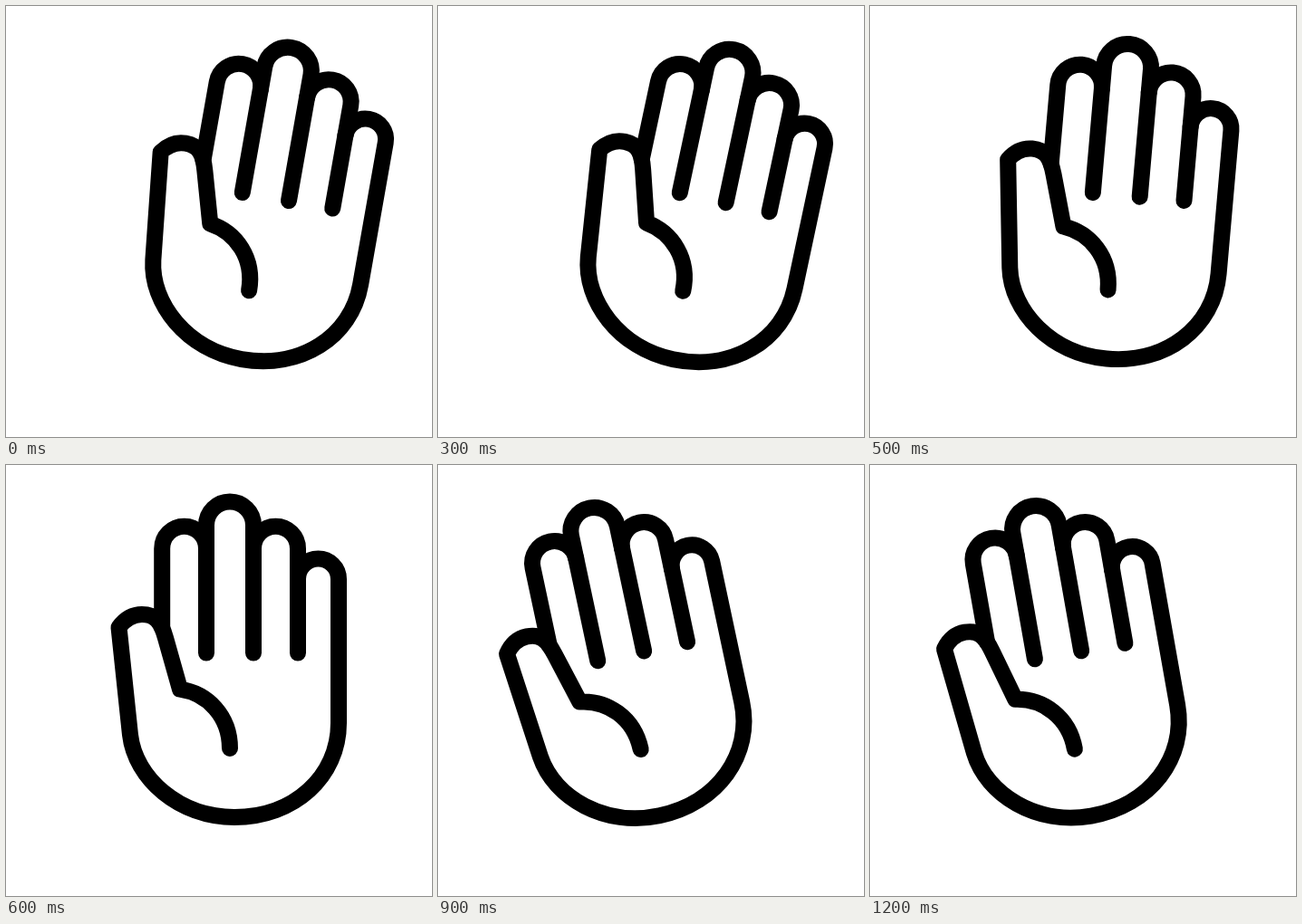
Write an HTML page that moves like this. It is 470 by 476 pixels and loops after 1.3 s.

```html
<!DOCTYPE html>
<html lang="en">
<head>
<meta charset="utf-8">
<title>Waving hand</title>
<style>
  html, body { margin: 0; width: 100%; height: 100%; overflow: hidden; background: #fff; }
  svg { display: block; width: 100%; height: 100%; }
</style>
</head>
<body>
<svg viewBox="0 0 470 476">
  <g id="hand" fill="none" stroke="#000" stroke-width="18" stroke-linecap="round" stroke-linejoin="round">
    <!-- index, middle and ring fingers -->
    <path d="M172.2 180V92.2a24.4 24.4 0 0 1 48.8 0"/>
    <path d="M221 207.6V66.6a26 26 0 0 1 52 0V207.6"/>
    <path d="M273 92.3a24.5 24.5 0 0 1 49 0V207.6"/>
    <!-- little finger, palm, thumb and crease -->
    <path d="M322 126a22.5 22.5 0 0 1 45 0V285C367 344 318 389 252 389
      C191 389 142.5 346 137 298L124.5 179.3C132 169 141 165 150 165
      C165 165 171 173 176 191L192 247.7C222 252 247 277 247 313"/>
  </g>
</svg>
<script>
  const hand = document.getElementById('hand');
  const STEP = 100, STEPS = 13, MIDDLE = 6, SHIFT = 10;
  const swing = [0, 5, 10, 12, 13, 12, 10]; // degrees, by steps away from upright

  function draw(now) {
    const step = Math.floor(now / STEP) % STEPS;
    const side = Math.sign(MIDDLE - step);
    const angle = side * swing[Math.abs(MIDDLE - step)];
    hand.setAttribute('transform', `translate(${side * SHIFT} 0) rotate(${angle} 245 377)`);
  }

  const start = performance.now();
  function tick() {
    draw(performance.now() - start);
    requestAnimationFrame(tick);
  }
  tick();
</script>
</body>
</html>
```
